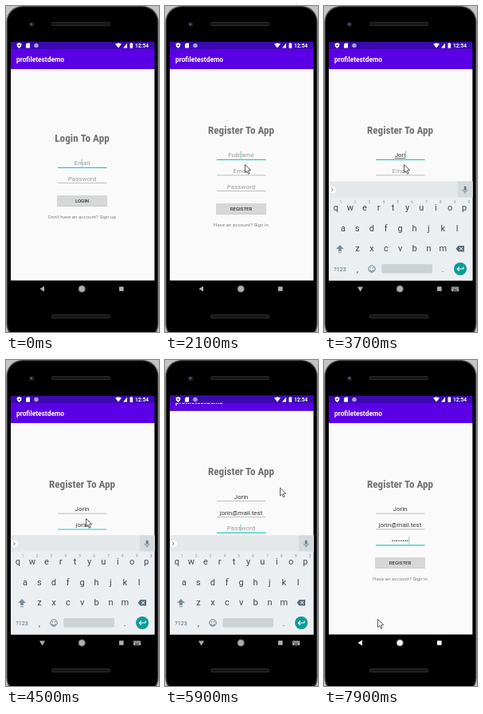
These frames come from a looping animation (192x408 px, 8000 ms). An HTML page with a canvas:

```html
<!DOCTYPE html>
<html lang="en">
<head>
<meta charset="utf-8">
<title>Sign-up on a phone</title>
<style>
  html, body { margin: 0; width: 100%; height: 100%; overflow: hidden; background: #000; }
  canvas { display: block; width: 192px; height: 408px; }
</style>
</head>
<body>
<canvas id="stage"></canvas>
<script>
const W = 192, H = 408, LOOP = 8000, STEP = 100;
const canvas = document.getElementById('stage');
const dpr = window.devicePixelRatio || 1;
canvas.width = W * dpr;
canvas.height = H * dpr;
const c = canvas.getContext('2d');

const SCREEN = { x: 6, y: 44.4, w: 180.6, h: 299.2 };
const BOTTOM = SCREEN.y + SCREEN.h;
const TEAL = '#2cc8bb', CARET = '#7fd3cb', INK = '#37474f', HINT = '#9b9b9b';
const NAME = 'Jorin', EMAIL = 'jorin@mail.test', PASSWORD = 'kindness';

const clamp = v => Math.max(0, Math.min(1, v));
const ramp = (t, a, b) => clamp((t - a) / (b - a));
const ease = p => p * p * (3 - 2 * p);
const typed = (t, start, gap) => Math.max(0, Math.floor((t - start) / gap + 1e-6) + 1);

function text(str, x, y, size, color, { weight = 400, align = 'center', stretch = 'normal', family = 'Roboto', max = Infinity } = {}) {
  const setFont = s => c.font = `${weight} ${stretch} ${s}px ${family}, "Open Sans", sans-serif`;
  setFont(size);
  const width = c.measureText(str).width;
  if (width > max) setFont(size * max / width);
  c.textAlign = align;
  c.textBaseline = 'alphabetic';
  c.fillStyle = color;
  c.fillText(str, x, y + size * 0.36);
  return c.measureText(str).width;
}

function rect(x, y, w, h, color, r = 0) {
  c.fillStyle = color;
  c.beginPath();
  c.roundRect(x, y, w, h, r);
  c.fill();
}

const band = (top, bottom, color) => rect(SCREEN.x, top, SCREEN.w, bottom - top, color);

function disc(x, y, r, color) {
  c.fillStyle = color;
  c.beginPath();
  c.arc(x, y, r, 0, 7);
  c.fill();
}

function poly(points, fill, stroke, width = 1, close = true) {
  c.beginPath();
  points.forEach(([x, y]) => c.lineTo(x, y));
  if (close) c.closePath();
  if (fill) { c.fillStyle = fill; c.fill(); }
  if (stroke) { c.strokeStyle = stroke; c.lineWidth = width; c.stroke(); }
}

function clipped(draw) {
  c.save();
  c.beginPath();
  c.rect(SCREEN.x, SCREEN.y, SCREEN.w, SCREEN.h);
  c.clip();
  draw();
  c.restore();
}

function speaker(y) {
  rect(57, y, 74, 5, '#2b2b2b', 2.5);
  rect(58, y + 1, 72, 3, '#161616', 1.5);
}

function phone() {
  rect(0, 0, W, H, '#c4c4c4');
  rect(0.5, 0, 191, 418, '#4a4a4a', 20);
  rect(1.8, 1.2, 188.4, 415, '#000', 19);
  disc(32, 23, 3.6, '#14151c');
  disc(32, 23, 1.7, '#3b3f58');
  disc(31.6, 22.6, 0.8, '#8589a0');
  speaker(20);
  speaker(386);
}

function statusBar() {
  band(SCREEN.y, 53.8, '#3a0ab0');
  poly([[13.5, 47.2], [16.5, 46], [19.5, 47.2], [19, 50.5], [16.5, 53], [14, 50.5]], '#fff');
  disc(16.5, 49.3, 1, '#3a0ab0');
  poly([[25, 48], [26.5, 46.5], [30, 46.5], [30, 52.5], [25, 52.5]], '#fff');
  disc(38, 49.5, 2.8, '#a99bd8');
  poly([[137, 47.5], [141, 46.3], [145, 47.5], [141, 52.6]], '#fff');
  poly([[147, 52.5], [152, 46.5], [152, 52.5]], '#fff');
  rect(155.5, 46.7, 3.6, 6, '#fff', 0.5);
  rect(156.5, 46, 1.6, 1, '#fff');
  text('12:54', 170.5, 49.5, 6.5, '#fff', { weight: 700 });
}

function appBar() {
  band(53, 79, '#5b00e6');
  text('profiletestdemo', 13, 67, 8.4, '#fff', { weight: 700, align: 'left', max: 63 });
}

function field(y, hint, value, { focus = false, caret = false, composing = false } = {}) {
  const filled = value.length > 0;
  const width = text(value || hint, 95.5, y, 8, filled ? '#3a3a3a' : HINT);
  if (composing && filled) rect(95.5 - width / 2, y + 3.6, width, 0.6, '#555');
  rect(65, y + 5.2, 61.5, focus ? 1.2 : 0.8, focus ? TEAL : '#aaa');
  if (focus && caret) rect(filled ? 95.5 + width / 2 : 94.7, y - 5, 1, 9.5, CARET);
}

function button(label, y) {
  rect(64, y + 0.8, 63, 13, '#bdbdbd', 1);
  rect(64, y, 63, 13, '#d6d7d7', 1);
  text(label, 95.5, y + 6.5, 6, '#333', { weight: 500, max: 27.5 });
}

function heading(str, y, max) {
  text(str, 95.5, y, 14, '#707070', { weight: 700, stretch: 'condensed', family: '"Roboto Condensed", Roboto', max });
}

const link = (str, y, max) => text(str, 95.5, y, 6.3, '#808080', { max });

function loginPage(t) {
  band(79, 344, '#fafafa');
  heading('Login To App', 164.5, 68.5);
  field(196.5, 'Email', '', { focus: true, caret: t % 1000 < 500 });
  field(216, 'Password', '');
  button('LOGIN', 237);
  link("Don't have an account? Sign up", 263.5, 85);
}

function registerPage(t) {
  const blink = t % 1000 < 500;
  const focus = t < 4000 ? 0 : t < 5900 ? 1 : 2;
  const dots = Math.min(typed(t, 6300, 100), PASSWORD.length);
  const showLast = dots > 0 && t < 7500;
  const secret = '•'.repeat(showLast ? dots - 1 : dots) + (showLast ? PASSWORD[dots - 1] : '');
  const busy = (t >= 3000 && t < 6000) || (t >= 6300 && t < 7200) || t >= 7800;
  const state = i => ({ focus: focus === i, caret: blink || busy });

  band(79, 360, '#fafafa');
  heading('Register To App', 154.5, 83);
  field(186.5, 'Fullname', NAME.slice(0, typed(t, 3100, 200)), { ...state(0), composing: focus === 0 });
  const start = typed(t, 4100, 100);
  const mail = start <= 5 ? start : 5 + typed(t, 4600, 110);
  field(206.2, 'Email', EMAIL.slice(0, mail), state(1));
  field(226, 'Password', secret, state(2));
  button('REGISTER', 247);
  link('Have an account? Sign in', 273.3, 69);
}

function keyRow(keys, x, y, size = 11) {
  [...keys].forEach((k, i) => text(k, x + i * 17.9, y, size, INK));
}

function keyboard(secretMode) {
  band(219.5, 370, '#eceff1');
  if (secretMode) {
    keyRow('1234567890', 15, 230, 9.5);
  } else {
    band(219.5, 239.5, '#e4e8ea');
    disc(10.5, 230, 4.5, '#fff');
    poly([[9.3, 228], [11.3, 230], [9.3, 232]], null, '#455a64', 0.9, false);
    rect(168, 219.5, 19.5, 20, '#d5dadd');
    rect(175.7, 225.5, 2.8, 5.5, '#607d8b', 1.4);
    c.strokeStyle = '#607d8b';
    c.lineWidth = 0.8;
    c.beginPath();
    c.arc(177.1, 229.6, 2.9, 0, Math.PI);
    c.moveTo(177.1, 232.5);
    c.lineTo(177.1, 234.5);
    c.stroke();
    [...'1234567890'].forEach((d, i) => text(d, 21 + i * 17.9, 245.5, 4.5, '#78909c'));
  }
  keyRow('qwertyuiop', 15, 252.5);
  keyRow('asdfghjkl', 24, 278);
  keyRow('zxcvbnm', 42, 303.5);

  poly([[20, 299], [25, 304], [22, 304], [22, 307], [18, 307], [18, 304], [15, 304]], '#78909c');
  rect(18, 308.2, 4, 1, '#78909c');
  poly([[165.5, 303.7], [168.5, 300], [176, 300], [176, 307.4], [168.5, 307.4]], '#546e7a');
  poly([[170, 301.8], [174, 305.6]], null, '#fff', 1, false);
  poly([[174, 301.8], [170, 305.6]], null, '#fff', 1, false);

  text('?123', 20, 329, 7.2, '#546e7a');
  text(',', 42, 329, 10, INK);
  text('.', 149, 329, 10, INK);
  const left = secretMode ? 54.5 : 72.5;
  rect(left, 323, 136 - left, 11.5, '#cdd2d5', 1.5);
  if (!secretMode) {
    c.strokeStyle = '#546e7a';
    c.lineWidth = 0.9;
    c.beginPath();
    c.arc(60, 329, 4.2, 0, 7);
    c.moveTo(62.2, 330);
    c.arc(60, 330, 2.2, 0, Math.PI);
    c.stroke();
    disc(58.5, 327.8, 0.7, '#546e7a');
    disc(61.5, 327.8, 0.7, '#546e7a');
  }
  disc(171, 329, 8, '#0b9c98');
  poly([[167, 329], [175, 329]], null, '#fff', 1.1, false);
  if (secretMode) {
    poly([[171.5, 326.5], [174, 329], [171.5, 331.5]], null, '#fff', 1.1, false);
    poly([[175.5, 326], [175.5, 332]], null, '#fff', 1.1, false);
  } else {
    poly([[169.7, 326.5], [167.2, 329], [169.7, 331.5]], null, '#fff', 1.1, false);
    poly([[175, 329], [175, 326.5]], null, '#fff', 1.1, false);
  }
}

function navBar(t, typing) {
  const color = t >= 7600 ? '#fff' : '#b0b0b0';
  poly(typing ? [[42, 351.5], [49, 351.5], [45.5, 357.5]] : [[48, 350.5], [48, 357.5], [42.5, 354]], color);
  disc(95.2, 354, 4.6, '#666');
  disc(95.2, 354, 3.5, color);
  rect(142, 351.2, 5.6, 5.6, color, 0.5);
  if (typing) {
    rect(160, 351.5, 9, 5.5, color, 0.6);
    for (let i = 0; i < 4; i++) rect(161 + i * 1.9, 352.7, 1, 1, '#000');
    rect(162, 355, 5, 0.9, '#000');
  }
}

// Pointer stops: time, x, y
const POINTER = [
  [100, 195, 190], [500, 165, 232], [900, 122, 261], [1500, 122, 261], [2000, 100, 198],
  [4700, 100, 198], [5200, 144, 159.5], [7000, 144, 159.5], [7500, 48, 349], [7700, 48, 349], [7900, 67, 324]
];

function pointer(t) {
  if (t <= 100) return;
  let i = POINTER.findIndex(p => p[0] >= t);
  if (i < 0) i = POINTER.length - 1;
  const [t0, x0, y0] = POINTER[i - 1], [t1, x1, y1] = POINTER[i];
  const p = ease(ramp(t, t0, t1));
  c.save();
  c.translate(x0 + (x1 - x0) * p, y0 + (y1 - y0) * p);
  poly([[0.5, 0.5], [0.5, 10.5], [2.8, 8.4], [4.6, 12.2], [6.2, 11.4], [4.5, 7.8], [7.7, 7.6]], '#fff', '#333', 0.8);
  c.restore();
}

function render(t) {
  c.setTransform(dpr, 0, 0, dpr, 0, 0);
  phone();

  const enter = ease(ramp(t, 1200, 1600));
  const pan = t < 5900 ? 0 : 15.5 * (1 - ramp(t, 7700, 7800));
  clipped(() => {
    c.translate(0, -pan);
    if (enter < 1) loginPage(t);
    if (enter > 0) {
      c.save();
      c.globalAlpha = enter;
      c.translate(0, 24 * (1 - enter));
      registerPage(t);
      c.restore();
    }
    appBar();
    c.translate(0, pan);
    statusBar();
  });

  const typing = t >= 3300 && t < 7700;
  navBar(t, typing);

  const shown = ease(ramp(t, 3100, 3500)) * (1 - ramp(t, 7600, 7800));
  if (shown > 0) {
    clipped(() => {
      c.globalAlpha = shown;
      c.translate(0, 62 * (1 - shown));
      keyboard(t >= 6100);
    });
    // The half-faded keyboard window also veils the navigation bar.
    if (shown < 1) {
      c.globalAlpha = shown;
      band(BOTTOM, 364.5, '#d8dbdd');
      c.globalAlpha = 1;
    }
  }
  pointer(t);
}

function tick() {
  const t = performance.now() % LOOP;
  render(Math.floor(t / STEP) * STEP);
  requestAnimationFrame(tick);
}
tick();
</script>
</body>
</html>
```
